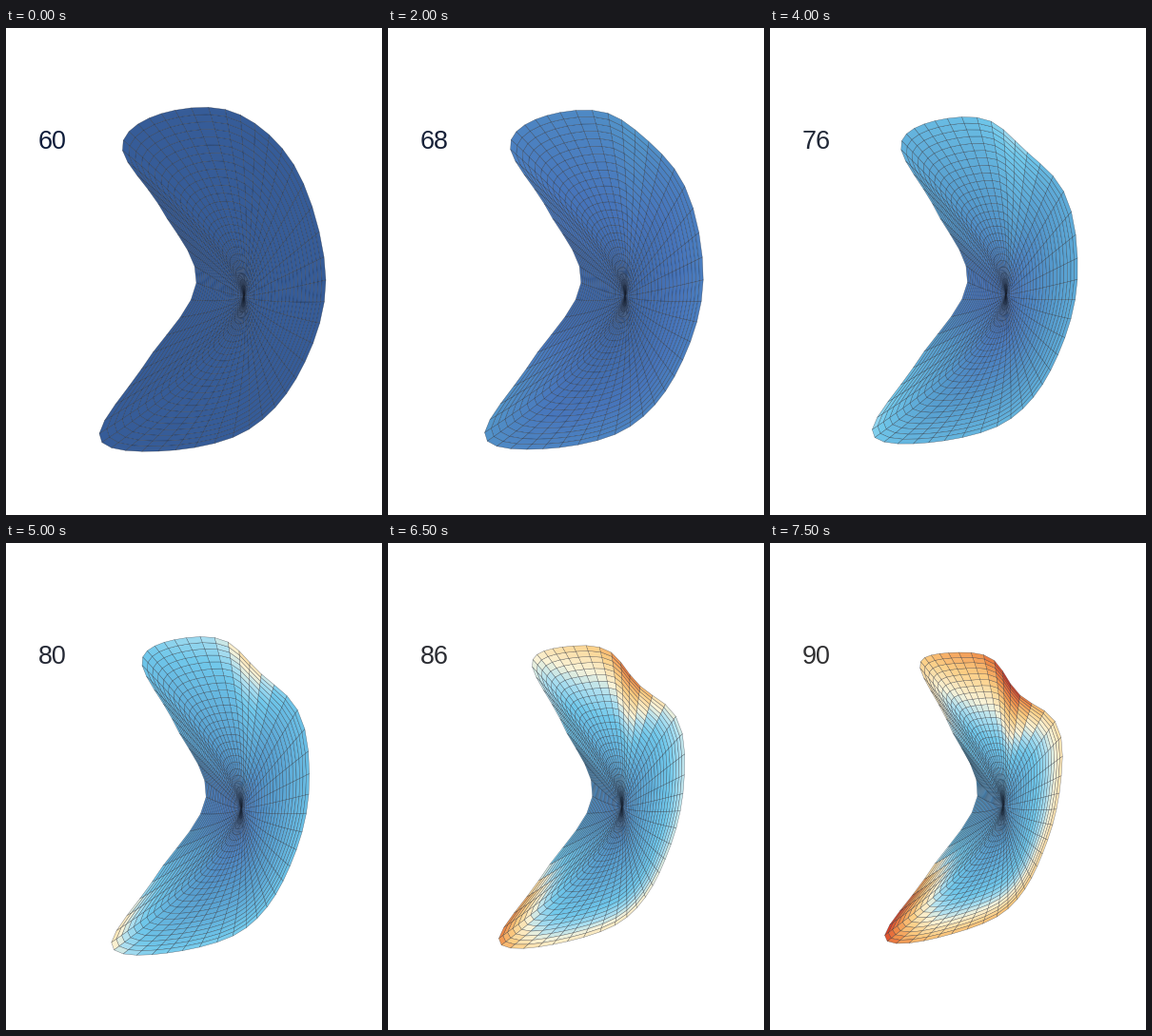
Recreate the animation shown at these times as a matplotlib script. Size 395 px wide and 512 px high, loop 7750 ms.

```python
import numpy as np
import matplotlib.pyplot as plt
from matplotlib.animation import FuncAnimation
from matplotlib.collections import PolyCollection

W, H, DPI = 395, 512, 100
FRAMES, STEP = 31, 250
RINGS, SPOKES = 26, 56

# Relaxed rim, one key point every 30 degrees, counter-clockwise from the right.
RIM = np.array([
    (336, 265), (306, 150), (241, 89), (163, 90), (122, 125), (163, 190),
    (200, 268), (146, 353), (98, 430), (160, 445), (250, 425), (308, 363)], float)
CORE, CORE_SHIFT = np.array([250, 282]), np.array([-5, -6])

CORE_STRAIN = .21
STOPS = [0, .12, .25, .45, .53, .59, .70, .82, 1]
COLOURS = np.array([
    (54, 92, 152), (71, 117, 187), (85, 155, 205), (112, 200, 235),
    (175, 224, 240), (250, 243, 215), (252, 206, 132), (240, 145, 75),
    (215, 55, 35)]) / 255
INK = np.array([(14, 28, 58), (48, 48, 50)]) / 255


def lerp(a, b, t):
    return a + (b - a) * t


def closed_curve(points, count):
    """Sample a closed Catmull-Rom curve evenly in its parameter."""
    n = len(points)
    s = np.arange(count) * n / count
    i = s.astype(int)
    t = (s - i)[:, None]
    a, b, c, d = (points[(i + k) % n] for k in (-1, 0, 1, 2))
    return b + t / 2 * (c - a + t * (2 * a - 5 * b + 4 * c - d
                                     + t * (3 * (b - c) + d - a)))


def bump(angle, centre, width):
    """Smooth weight around one direction, in degrees."""
    gap = (np.degrees(angle) - centre + 180) % 360 - 180
    return np.exp(-(gap / width) ** 2)


def rim_strain(angle):
    """Final strain on the rim: high at notch and tips, low at the hollow."""
    return (.64 + .30 * bump(angle, 52, 15) + .15 * bump(angle, 80, 35)
            + .36 * bump(angle, 232, 22) + .10 * bump(angle, 290, 40)
            - .38 * bump(angle, 180, 24))


def colour(v):
    return np.stack([np.interp(v, STOPS, c) for c in COLOURS.T], -1)


theta = np.arange(SPOKES) * 2 * np.pi / SPOKES
cos, sin = np.cos(theta), np.sin(theta)
radius = np.linspace(0, 1, RINGS + 1)[:, None]
fold = bump(theta, 48, 22) + .8 * bump(theta, 235, 22)

relaxed = closed_curve(RIM, SPOKES)
shrink = np.stack([6 - 26 * cos - 14 * np.cos(2 * theta) + 4 * sin,
                   -2 + 28 * sin + 13 * np.sin(2 * theta)], -1)
# Notch, shoulder and upper tip move on top of the overall shrinking.
dent = sum(bump(theta, angle, width)[:, None] * np.array(move)
           for angle, width, move in [(46, 16, (-6, 17)), (22, 16, (13, 0)),
                                      (122, 20, (6, -7))])

mid_r = (radius[1:] + radius[:-1]) / 2
mid_theta = theta + np.pi / SPOKES
strain = lerp(CORE_STRAIN, rim_strain(mid_theta),
              mid_r ** (1.5 - .4 * np.sin(mid_theta)))


def mesh(u):
    """Grid of nodes, ring by spoke, at progress u."""
    ease = np.array([u ** 1.4, u ** 1.9])
    core = CORE + CORE_SHIFT * ease
    outer = relaxed + shrink * ease + dent * u - core
    rx, ry = lerp(28, 21, u), lerp(140, 128, u)
    inner = np.stack([rx * cos, -ry * sin], -1)
    squeeze = .25 + .45 * u * fold
    rho = (radius + squeeze * radius ** 2 * (1 - radius))[..., None]
    return core + rho * lerp(inner, outer, rho ** .85)


def quads(nodes):
    near, far = nodes[:-1], nodes[1:]
    faces = np.stack([near, far, np.roll(far, -1, 1), np.roll(near, -1, 1)], 2)
    return faces.reshape(-1, 4, 2)


fig = plt.figure(figsize=(W / DPI, H / DPI), dpi=DPI, facecolor="white")
ax = fig.add_axes([0, 0, 1, 1])
ax.set(xlim=(0, W), ylim=(H, 0))
ax.axis("off")

surface = PolyCollection(quads(mesh(0)), edgecolors=(.09, .11, .15, .6),
                         linewidths=.3, joinstyle="round")
ax.add_collection(surface, autolim=False)
label = ax.text(33.5, 127, "60", family="Liberation Sans", va="baseline",
                size=27 * 72 / DPI)


def draw(i):
    u = i / (FRAMES - 1)
    surface.set_verts(quads(mesh(u)))
    surface.set_facecolor(colour(strain * u ** 1.1).reshape(-1, 3))
    label.set_text(str(60 + i))
    label.set_color(lerp(INK[0], INK[1], u))
    return surface, label


anim = FuncAnimation(fig, draw, frames=FRAMES, interval=STEP,
                     repeat=True, repeat_delay=0, blit=False)
plt.show()
```
